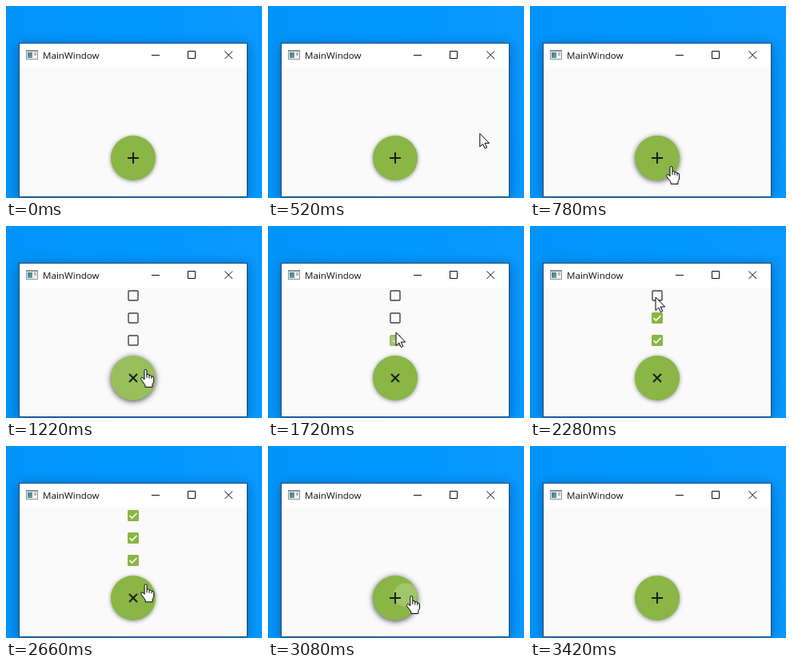
These frames come from a looping animation (320x240 px, 3600 ms). An HTML page with a canvas:

```html
<!DOCTYPE html>
<html>
<head>
<meta charset="utf-8">
<style>
html, body { margin: 0; width: 100%; height: 100%; overflow: hidden; }
canvas { display: block; }
</style>
</head>
<body>
<canvas id="stage" width="320" height="240"></canvas>
<script>
const c = document.getElementById('stage').getContext('2d');
const LOOP = 3600, GREEN = '#89b645', TAU = Math.PI * 2;
const BOX_X = 159, BUTTON = { x: 159, y: 190, r: 28 };
const boxes = [
  { y: 143, open: 1060, check: 1660 },
  { y: 115, open: 1090, check: 2020 },
  { y: 87, open: 1120, check: 2400 }
];
// Pointer hot spot: time, x, y
const route = [
  [460, 288, 146], [560, 250, 168], [680, 200, 194], [780, 176, 200], [1080, 176, 200],
  [1220, 174, 179], [1400, 164, 152], [1500, 160, 149], [1640, 160, 149], [1700, 160, 133],
  [1840, 160, 133], [1980, 158, 117], [2080, 158, 117], [2160, 157, 99], [2180, 157, 97],
  [2280, 157, 89], [2460, 157, 89], [2580, 166, 142], [2700, 178, 187], [3180, 179, 187],
  [3300, 198, 191], [3400, 238, 198], [3420, 238, 198]
];
const arrow = new Path2D('M0 0V16.5L3.8 13L6.3 18.5L8.8 17.5L6.3 12H11.7Z');
const hand = new Path2D('M5 2Q5 .5 6.5 .5Q8 .5 8 2V7Q9 6 10.5 7L11 8Q13 7 14 9Q16.7 8.6 16.7 11V15Q16.7 17 15 19V22.5H6V20L1.5 14Q-.5 11 2 10.5Q4 11 5 13Z');
const knuckles = new Path2D('M8 7V11M11 8V11.5M14 9V12');

const ramp = (t, a, b) => Math.max(0, Math.min(1, (t - a) / (b - a)));
const ease = (t, a, b) => { const k = ramp(t, a, b); return k * k * (3 - 2 * k); };

function line(path, color, width = 1) {
  c.strokeStyle = color;
  c.lineWidth = width;
  c.stroke(new Path2D(path));
}

function rect(color, x, y, w, h) {
  c.fillStyle = color;
  c.fillRect(x, y, w, h);
}

function disc(color, x, y, r) {
  c.fillStyle = color;
  c.beginPath();
  c.arc(x, y, r, 0, TAU);
  c.fill();
}

function shadow(color, blur, dy) {
  c.shadowColor = color;
  c.shadowBlur = blur;
  c.shadowOffsetY = dy;
}

function drawWindow() {
  const sky = c.createLinearGradient(0, 60, 320, 0);
  sky.addColorStop(0, '#0094fa');
  sky.addColorStop(0.5, '#0098ff');
  sky.addColorStop(1, '#0a98ff');
  rect(sky, 0, 0, 320, 240);
  c.save();
  shadow('rgba(0,20,60,.4)', 14, 2);
  rect('#16476f', 16, 46, 286, 193);
  c.restore();
  rect('#fff', 17, 47, 284, 30);
  rect('#fafafa', 17, 77, 284, 161);

  rect('#8c9094', 25, 55, 15, 12);
  rect('#f4f4f4', 26, 57, 13, 9);
  const pane = c.createLinearGradient(27, 58, 33, 65);
  pane.addColorStop(0, '#3c7f9c');
  pane.addColorStop(1, '#6aa594');
  rect(pane, 27, 58, 6, 7);
  rect('#b8bcc0', 35, 58, 3, 4);

  c.fillStyle = '#111';
  c.font = '11.6px "Open Sans", "Noto Sans", sans-serif';
  c.fillText('MainWindow', 46, 66);
  line('M182 61.5H192M227.5 56.5H236.5V65.5H227.5ZM273.5 56.5L283 66M283 56.5L273.5 66', '#111');
}

function drawBox(t, { y, open, check }) {
  const size = ease(t, open, open + 90) * (1 - ease(t, 3000, 3080));
  if (!size) return;
  const on = ease(t, check, check + 100);
  c.save();
  c.translate(BOX_X, y);
  c.scale(size, size);
  c.globalAlpha = size;
  const wave = ramp(t, check, check + 120);
  const fade = 1 - ramp(t, check + 60, check + 200);
  if (wave && fade) disc(`rgba(137,182,69,${0.22 * fade})`, 0, 0, 13 * wave);
  c.beginPath();
  c.roundRect(-6, -6, 12, 12, 1);
  c.strokeStyle = `rgba(66,66,66,${1 - on})`;
  c.lineWidth = 1.4;
  c.stroke();
  if (on) {
    c.globalAlpha = size * on;
    c.fillStyle = GREEN;
    c.beginPath();
    c.roundRect(-7, -7, 14, 14, 1.5);
    c.fill();
    c.scale(on, on);
    line('M-4.5 0L-1.5 3L4.5 -3', '#fff', 1.6);
  }
  c.restore();
}

function ripple(t, start, x, y) {
  const grow = ramp(t, start, start + 200);
  const fade = 1 - ramp(t, start + 140, start + 360);
  if (grow && fade) disc(`rgba(255,255,255,${0.2 * fade})`, x, y, 2 + 52 * Math.pow(grow, 1.55));
}

function drawButton(t) {
  const { x, y, r } = BUTTON;
  const lift = ease(t, 720, 820) - ease(t, 1380, 1500) + ease(t, 2720, 2840) - ease(t, 3260, 3400);
  const turn = ease(t, 1020, 1180) - ease(t, 3000, 3080);
  c.save();
  shadow(`rgba(0,0,0,${0.45 + 0.25 * lift})`, 5 + 2 * lift, 1 + 0.5 * lift);
  disc(GREEN, x, y, r);
  c.restore();
  c.save();
  c.beginPath();
  c.arc(x, y, r, 0, TAU);
  c.clip();
  ripple(t, 1000, 176, 200);
  ripple(t, 3000, 172, 186);
  c.translate(x, y);
  c.rotate(turn * Math.PI / 4);
  line('M-7 0H7M0 -7V7', '#1c1c1c', 2);
  c.restore();
}

function drawPointer(t) {
  const i = route.findIndex(p => p[0] > t);
  if (i < 1) return;
  const [a, ax, ay] = route[i - 1], [b, bx, by] = route[i];
  const k = ramp(t, a, b);
  const x = ax + (bx - ax) * k, y = ay + (by - ay) * k;
  const over = Math.hypot(x - BUTTON.x, y - BUTTON.y) < BUTTON.r;
  const shape = over ? hand : arrow;
  c.save();
  c.translate(over ? x - 6 : x, y);
  c.lineJoin = 'round';
  c.lineWidth = 1;
  c.strokeStyle = '#000';
  c.fillStyle = '#fff';
  c.fill(shape);
  c.stroke(shape);
  if (over) c.stroke(knuckles);
  c.restore();
}

function frame(now) {
  const t = now % LOOP;
  drawWindow();
  boxes.forEach(b => drawBox(t, b));
  drawButton(t);
  drawPointer(t);
  requestAnimationFrame(() => frame(performance.now() - begin));
}

const begin = performance.now();
frame(0);
</script>
</body>
</html>
```
